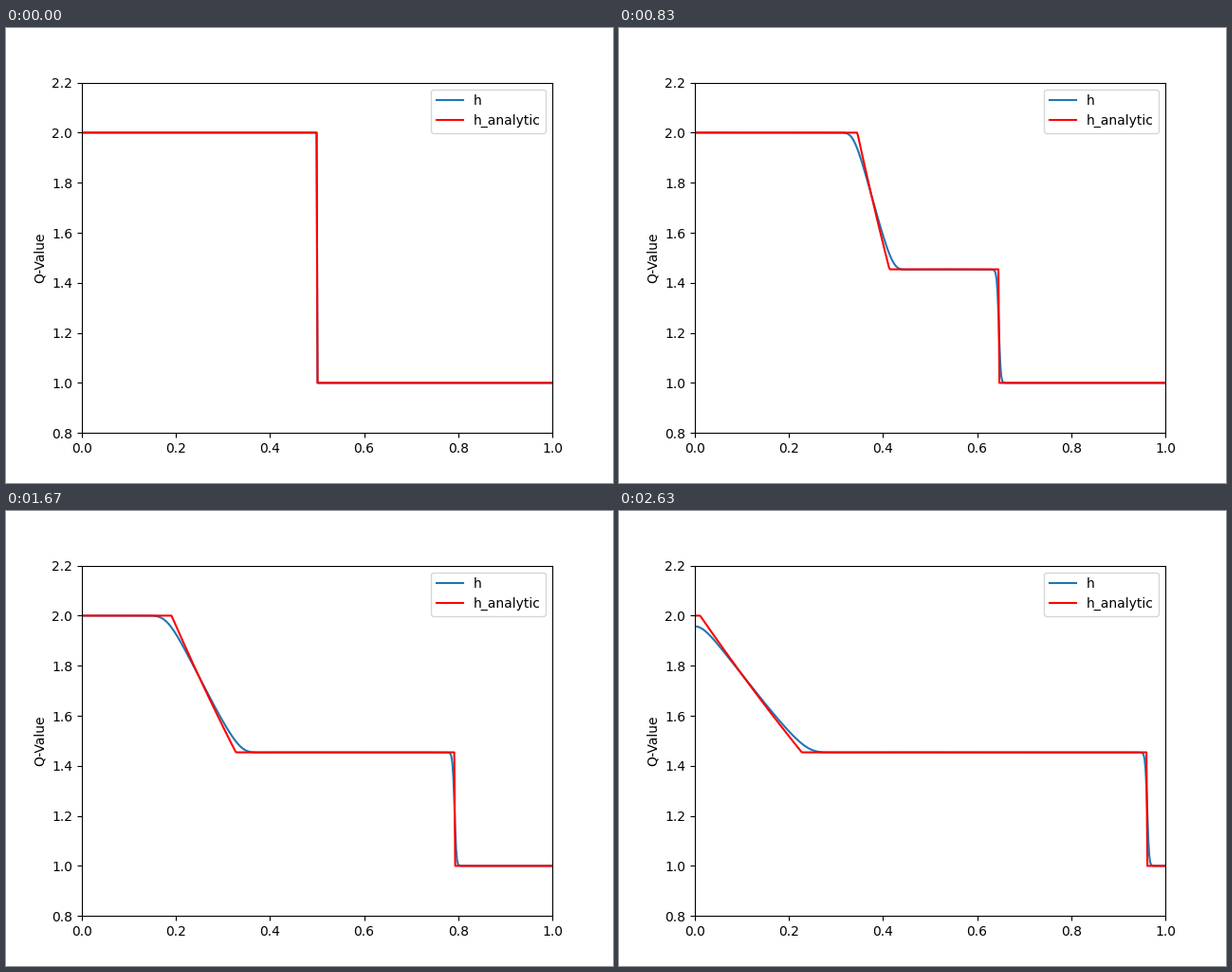
A matplotlib script that plays this animation: 640x480 px, repeating every 2.66 s.

```python
import numpy as np
import matplotlib.pyplot as plt
from matplotlib.animation import FuncAnimation

G = 9.81
H_LEFT, H_RIGHT, X_DAM = 2.0, 1.0, 0.5
CELLS = 500
STATES = 80
STATE_DT = 0.001397
SUBSTEPS = 5
TICK_MS = 10
TICKS = 266

x = np.linspace(0, 1, CELLS)
dx = x[1] - x[0]


def middle_depth():
    """Depth between rarefaction and shock, by bisection."""
    lo, hi = H_RIGHT, H_LEFT
    for _ in range(60):
        h = (lo + hi) / 2
        u_fan = 2 * (np.sqrt(G * H_LEFT) - np.sqrt(G * h))
        u_shock = (h - H_RIGHT) * np.sqrt(G * (h + H_RIGHT) / (2 * h * H_RIGHT))
        lo, hi = (h, hi) if u_fan > u_shock else (lo, h)
    return h


H_MID = middle_depth()
C_LEFT = np.sqrt(G * H_LEFT)
C_MID = np.sqrt(G * H_MID)
U_MID = 2 * (C_LEFT - C_MID)
SHOCK = H_MID * U_MID / (H_MID - H_RIGHT)


def analytic(t):
    if t == 0:
        return np.where(x < X_DAM, H_LEFT, H_RIGHT)
    s = (x - X_DAM) / t
    fan = (2 * C_LEFT - s) ** 2 / (9 * G)
    return np.select([s < -C_LEFT, s < U_MID - C_MID, s < SHOCK],
                     [H_LEFT, fan, H_MID], H_RIGHT)


def hll_step(q, dt):
    """One first-order finite volume step between solid walls."""
    wall = np.array([[1], [-1]])
    q = np.hstack([q[:, :1] * wall, q, q[:, -1:] * wall])
    h, hu = q
    u, c = hu / h, np.sqrt(G * h)
    f = np.array([hu, hu * u + G * h ** 2 / 2])
    slow = np.minimum((u - c)[:-1], (u - c)[1:])
    fast = np.maximum((u + c)[:-1], (u + c)[1:])
    flux = (fast * f[:, :-1] - slow * f[:, 1:]
            + slow * fast * (q[:, 1:] - q[:, :-1])) / (fast - slow)
    return q[:, 1:-1] - dt / dx * (flux[:, 1:] - flux[:, :-1])


def simulate():
    q = np.array([analytic(0), np.zeros(CELLS)])
    depths = [q[0]]
    for _ in range(STATES - 1):
        for _ in range(SUBSTEPS):
            q = hll_step(q, STATE_DT / SUBSTEPS)
        depths.append(q[0])
    return depths


numeric = simulate()
exact = [analytic(k * STATE_DT) for k in range(STATES)]

fig, ax = plt.subplots(figsize=(6.4, 4.8), dpi=100)
h_line, = ax.plot(x, numeric[0], color="tab:blue", label="h")
exact_line, = ax.plot(x, exact[0], color="red", label="h_analytic")
ax.set_xlim(0, 1)
ax.set_ylim(0.8, 2.2)
ax.set_ylabel("Q-Value")
ax.legend(loc="upper right")


def update(tick):
    # 30 states per second on a 10 ms clock
    k = (3 * tick + 1) // 10
    h_line.set_ydata(numeric[k])
    exact_line.set_ydata(exact[k])
    return h_line, exact_line


anim = FuncAnimation(fig, update, frames=TICKS, interval=TICK_MS,
                     repeat=True, repeat_delay=0)
plt.show()
```
